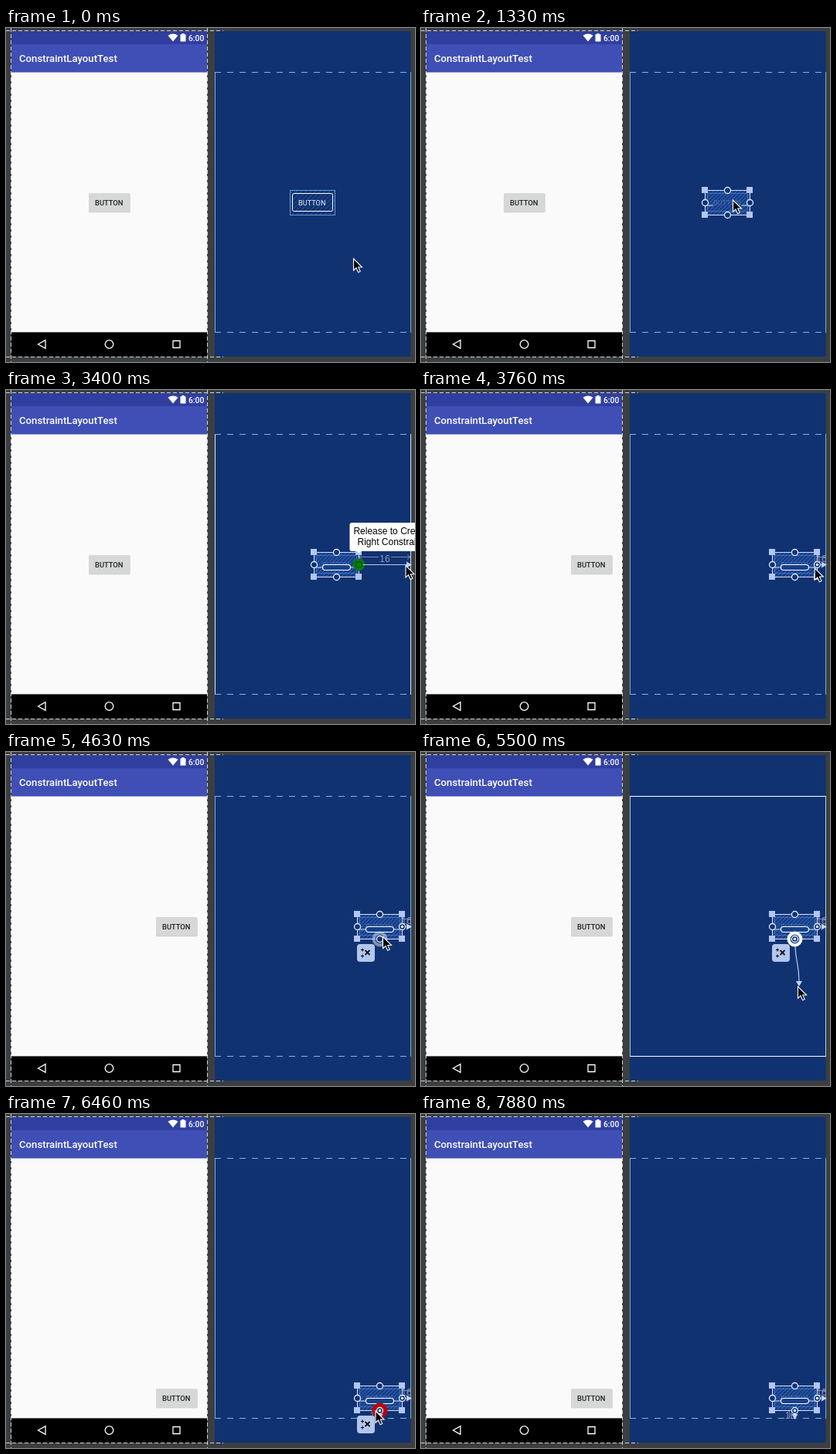
An HTML page for the animation above (8840 ms loop, 529 px wide and 433 px high).

```html
<!DOCTYPE html>
<html lang="en">
<head>
<meta charset="utf-8">
<title>Constraint editing</title>
<style>
html, body { margin: 0; width: 100%; height: 100%; overflow: hidden; background: #3c3f41; }
svg { display: block; width: 529px; height: 433px; }
text { font-family: Roboto, "Liberation Sans", sans-serif; }
.bold { font-weight: 500; }
.sans { font-family: "Liberation Sans", Arial, sans-serif; font-size: 12px; }
.frame { stroke: #d4d4d4; stroke-dasharray: 5 3; }
.nav { fill: none; stroke: #fff; stroke-width: 1.3; }
.handle { fill: #113271; stroke: #e4edff; stroke-width: 1.3; }
.corner { fill: #b3c6f2; }
.size { fill: none; stroke: #8288b0; }
.size + text { fill: #9498bd; }
.wire { fill: none; stroke: #b9cbf3; stroke-width: 1.2; }
.head { fill: #c3d2f7; }
</style>
</head>
<body>
<svg viewBox="0 0 529 433">
  <defs>
    <pattern id="thin" width="6" height="6" patternUnits="userSpaceOnUse">
      <path d="M-1 7L7 -1M-1 1L1 -1M5 7L7 5" stroke="#325c98" stroke-width=".8"/>
    </pattern>
    <pattern id="dense" width="5" height="5" patternUnits="userSpaceOnUse">
      <rect width="5" height="5" fill="#17408a"/>
      <path d="M-1 6L6 -1M-1 1L1 -1M4 6L6 4" stroke="#416eb8" stroke-width=".8"/>
    </pattern>
    <clipPath id="sheet"><rect x="270" y="4" width="254" height="391"/></clipPath>
  </defs>

  <rect width="529" height="433" fill="#3c3f41"/>

  <g id="device">
    <rect x="7" y="4" width="253" height="422" fill="#fafafa"/>
    <rect x="7" y="4" width="253" height="17" fill="#303f9f"/>
    <rect x="7" y="21" width="253" height="36.500" fill="#3f4fb6"/>
    <rect x="7" y="394.400" width="253" height="31.600" fill="#000"/>
    <path d="M209.500 9.800Q216 5 222.500 9.800L216 17.600Z" fill="#fff"/>
    <path d="M225.500 8.200h2v-1.200h3v1.200h2v9.300h-7z" fill="#fff"/>
    <text class="bold" x="236" y="17" font-size="10.3" fill="#fff">6:00</text>
    <text class="bold" x="17" y="43.500" font-size="13.2" fill="#fff">ConstraintLayoutTest</text>
    <path class="nav" d="M41.500 410L51 404.700V415.300ZM216 405.500h9v9h-9z"/>
    <circle class="nav" cx="133.500" cy="410" r="5.300"/>
    <g id="button">
      <rect x="107" y="214.600" width="53.500" height="24.600" rx="1.500" fill="#c4c4c4"/>
      <rect x="107" y="214.300" width="53.500" height="24.500" rx="1.500" fill="#d6d7d7"/>
      <text class="bold" x="115" y="229.500" font-size="9.4" fill="#212121">BUTTON</text>
    </g>
    <path class="frame" d="M0 3.500H281M0 426.500H281M6.500 0V433M260.500 0V433"/>
  </g>

  <rect x="270" y="4" width="253.400" height="422" fill="#113271"/>
  <g fill="none" stroke="#7fb6e6">
    <path id="sides" d="M270.500 57V395M523.500 57V395"/>
    <path id="ends" d="M270 57.500H524M270 394.500H524"/>
  </g>

  <g clip-path="url(#sheet)">
    <g id="sizeX"><path class="size"/><text class="sans" text-anchor="middle">16</text></g>
    <g id="sizeY"><path class="size"/><text class="sans" text-anchor="middle">16</text></g>
  </g>

  <g id="widget">
    <g id="idle">
      <rect id="outline" x="367.500" y="210.500" width="58" height="32" fill="url(#thin)" stroke="#5e9cd3"/>
      <rect x="370.500" y="214.500" width="52" height="23" rx="2" fill="none" stroke="#fff"/>
      <text x="378" y="229.500" font-size="9.2" fill="#e6efff">BUTTON</text>
    </g>
    <g id="picked">
      <rect x="367.500" y="210.500" width="58" height="32" fill="url(#dense)" stroke="#d5e1fa"/>
      <rect x="370.500" y="214.500" width="52" height="23" rx="2" fill="none" stroke="#6a93d6" stroke-opacity=".5"/>
      <text x="378" y="229.500" font-size="9.2" fill="#a9c3ef" opacity=".3">BUTTON</text>
      <path d="M367 230H378M414.500 230H425" stroke="#d5e1fa"/>
      <rect id="pill" x="378.500" y="226.500" width="36" height="7" rx="3.500" fill="#17408a" stroke="#fff" stroke-width="1.100"/>
      <path class="corner" d="M363 206h8v8h-8zM421 206h8v8h-8zM363 238h8v8h-8zM421 238h8v8h-8z"/>
      <circle id="halo" r="9"/>
      <circle class="handle" cx="396.500" cy="210.500" r="4"/>
      <circle class="handle" cx="367.500" cy="226.500" r="4"/>
      <circle class="handle" cx="425.500" cy="226.500" r="4"/>
      <circle class="handle" cx="396.500" cy="242.500" r="4"/>
      <circle id="dotX" cx="425.500" cy="226.500" r="1.700" fill="#fff"/>
      <circle id="dotY" cx="396.500" cy="242.500" r="1.700" fill="#fff"/>
      <g id="snap">
        <circle r="7.500" fill="#078307" stroke="#0a6c0a"/>
        <circle r="4.200" fill="#0a7a12" stroke="#064f0a" stroke-width="1.300"/>
      </g>
    </g>
    <g id="action">
      <rect x="367" y="249" width="23" height="23" rx="4" fill="#b3c6ec"/>
      <path d="M377.500 257l6 6m0 -6l-6 6" stroke="#10141f" stroke-width="1.800"/>
      <path d="M374 254.500v4m-2 -2h4M374 262.500v4m-2 -2h4" stroke="#10141f" stroke-width="1.200"/>
    </g>
  </g>

  <g id="linkX"><path class="wire"/><path class="head"/></g>
  <g id="linkY"><path class="wire"/><path class="head"/></g>
  <g id="drag"><path class="wire"/><path class="head"/></g>

  <g id="tip">
    <path d="M3 -39H104a3 3 0 0 1 3 3V-5a3 3 0 0 1 -3 3H14.500L12 1 9.500 -2H3a3 3 0 0 1 -3 -3V-36a3 3 0 0 1 3 -3Z" fill="#fff"/>
    <text class="sans" x="53.300" y="-24" text-anchor="middle">Release to Create</text>
    <text class="sans" id="tipText" x="53" y="-10" text-anchor="middle"></text>
  </g>

  <path id="cursor" d="M0 0V15.200L3.500 12 6.100 17.800 8.700 16.600 6.200 11H11Z" fill="#000" stroke="#fff" stroke-width="1.100"/>
</svg>
<script>
const LOOP = 8840, TICK = 87.5;
const $ = id => document.getElementById(id);
const set = (el, attrs) => { for (const k in attrs) el.setAttribute(k, attrs[k]); };
const show = (id, on) => $(id).style.display = on ? '' : 'none';
const move = (id, x, y) => set($(id), { transform: `translate(${x} ${y})` });
const within = (n, a, b) => n >= a && n < b;

// Keys are [tick, x, y]; values between them are linear.
const pointer = [
  [4, 449.5, 299], [11, 399, 222], [14, 399, 222], [20, 426, 228], [25, 427, 228],
  [28, 451, 227.5], [35, 511, 227], [37, 517, 227.5], [42, 517, 228], [46, 486, 240],
  [49, 489, 240], [53, 487.5, 239.5], [57, 486, 240], [63, 487.5, 304], [67, 488, 378],
  [68, 488, 387], [71, 488, 387], [74, 478, 385], [76, 478, 385], [79, 518, 362],
  [80, 518, 362], [84, 531, 433]
];
const shift = [[37, 0, 0], [39, 31, 0], [42, 87, 0], [67, 87, 0], [71, 87, 142]];

function at(keys, n) {
  const i = keys.findIndex(k => k[0] > n);
  if (i === 0) return keys[0].slice(1);
  if (i < 0) return keys[keys.length - 1].slice(1);
  const a = keys[i - 1], b = keys[i], p = (n - a[0]) / (b[0] - a[0]);
  return [a[1] + (b[1] - a[1]) * p, a[2] + (b[2] - a[2]) * p];
}

const headRight = (x, y) => `M${x - 7} ${y - 4}L${x} ${y}L${x - 7} ${y + 4}Z`;
const headDown = (x, y) => `M${x - 4} ${y - 7}H${x + 4}L${x} ${y}Z`;

function arrow(id, wire, head) {
  const [w, h] = $(id).children;
  set(w, { d: wire });
  set(h, { d: head });
}

function drawSizes(right, side, bottom, foot) {
  let [line, label] = $('sizeX').children;
  const mid = (right + 523.5) / 2, y = side - 10;
  const wide = right < 490;
  set(line, { d: wide
    ? `M${right} ${y}H${mid - 8}M${mid + 8} ${y}H523M${right + 4} ${y - 3}l-4 3 4 3M519 ${y - 3}l4 3 -4 3`
    : `M${right} ${y}H523` });
  set(label, { x: mid, y: side - 4 });

  [line, label] = $('sizeY').children;
  const x = foot - 7, center = (bottom + 394.5) / 2;
  set(line, { d: bottom < 360
    ? `M${x} ${bottom}V${center - 8}M${x} ${center + 8}V394`
    : `M${x} ${bottom}V394` });
  set(label, { x: x + 1, y: center + 5 });
}

function draw(n) {
  const [cx, cy] = at(pointer, n), [dx, dy] = at(shift, n);
  const right = 425.5 + dx, side = 226.5 + dy, foot = 396.5 + dx, bottom = 242.5 + dy;
  const pickX = n < 45;
  const dragX = within(n, 25, 37), dragY = within(n, 58, 67);
  const snapX = within(n, 37, 43), snapY = within(n, 67, 72);

  move('cursor', cx, cy);
  show('cursor', n < 85);
  move('widget', dx, dy);
  move('button', n >= 43 ? 87 : 0, n >= 72 ? 142 : 0);

  show('idle', n < 14);
  show('picked', n >= 14);
  show('action', within(n, 45, 90));
  set($('outline'), { stroke: within(n, 9, 14) ? '#c4dcf5' : '#5e9cd3' });
  $('pill').style.opacity = Math.min(1, Math.max(0, (n - 25) / 6));

  const sideOn = within(n, 25, 43), endOn = within(n, 58, 72);
  set($('sides'), { stroke: sideOn ? '#d3e6f8' : endOn ? '#a5cdf0' : '#74acde' });
  set($('ends'), { stroke: endOn ? '#fff' : '#7fb6e6', 'stroke-dasharray': endOn ? 'none' : '8 8' });

  // Anchor highlight: hover glow, drag pulse, or delete warning.
  const hover = within(n, 20, 25) || within(n, 47, 58);
  const remove = within(n, 72, 77);
  const pulse = .6 - .4 * Math.cos((n - 28) * Math.PI / 5);
  show('halo', hover || dragX || dragY || remove);
  set($('halo'), {
    cx: pickX ? 425.5 : 396.5, cy: pickX ? 226.5 : 242.5,
    r: remove ? 7.5 : 8,
    fill: remove ? '#7c1030' : '#34558f',
    'fill-opacity': remove ? 1 : .6,
    stroke: remove ? '#bd0008' : '#fff',
    'stroke-width': remove ? 5 : 4,
    'stroke-opacity': remove ? 1 : hover ? .4 + .1 * Math.sin(n) : pulse
  });

  show('snap', snapX || snapY);
  move('snap', snapX ? 425.5 : 396.5, snapX ? 226.5 : 242.5);
  show('dotX', n >= 43);
  show('dotY', n >= 58 && !snapY);

  show('sizeX', n >= 37);
  show('sizeY', n >= 67);
  drawSizes(right, side, bottom, foot);

  show('linkX', n >= 37);
  arrow('linkX', right + 5 < 518 ? `M${right + 5} ${side}H518` : '', headRight(525, side));
  show('linkY', n >= 67);
  arrow('linkY', bottom + 5 < 388 ? `M${foot} ${bottom + 5}V388` : '', headDown(foot, 396));

  show('drag', dragX || dragY);
  if (dragX) {
    const ex = Math.max(434, cx - 11), ey = 230, mx = (right + ex) / 2;
    arrow('drag', `M${right + 4} ${side}C${mx} ${side} ${mx} ${ey} ${ex - 6} ${ey}`, headRight(ex, ey));
  } else if (dragY) {
    const ex = cx + 1.5, ey = Math.max(254, cy), my = (bottom + ey) / 2;
    arrow('drag', `M${foot + .5} ${bottom + 9}C${foot + 1} ${my} ${ex} ${my} ${ex} ${ey - 6}`, headDown(ex, ey));
  }

  show('tip', snapX || snapY);
  move('tip', (snapX ? right : foot) - 12, (snapX ? side : bottom) - 15.5);
  $('tipText').textContent = snapX ? 'Right Constraint' : 'Bottom Constraint';
}

const start = performance.now();
function tick() {
  const t = (performance.now() - start) % LOOP;
  draw(Math.floor(t / TICK + .2));
  requestAnimationFrame(tick);
}
tick();
</script>
</body>
</html>
```
